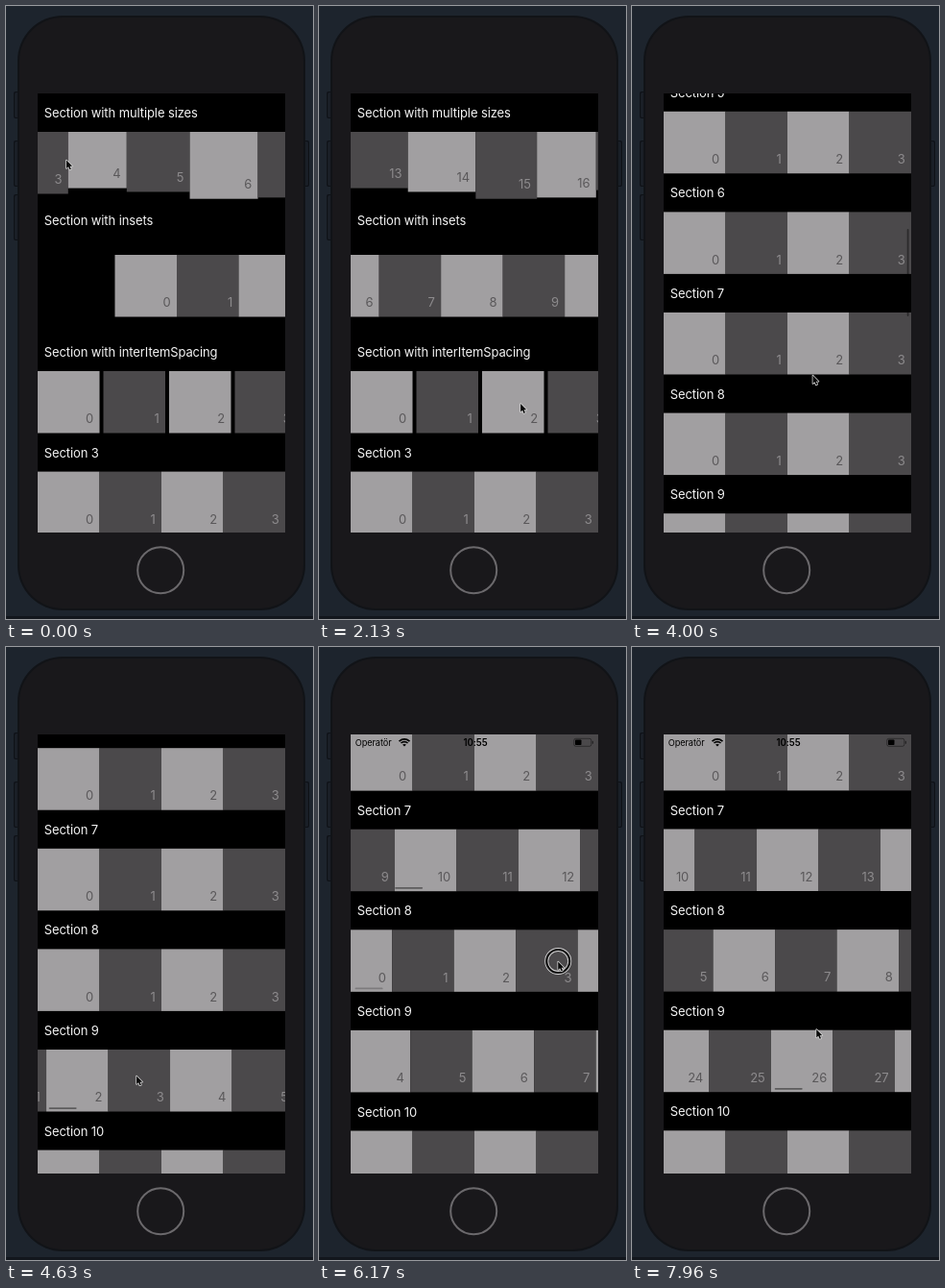
An HTML page with a canvas for the animation above (8000 ms loop, 320x638 px).

```html
<!DOCTYPE html>
<html lang="en">
<head>
<meta charset="utf-8">
<title>Sections</title>
<style>
  html, body { margin: 0; width: 100%; height: 100%; overflow: hidden; background: #1d242d; }
  canvas { display: block; width: 320px; height: 638px; }
</style>
</head>
<body>
<canvas id="stage"></canvas>
<script>
const LOOP = 8000;
const SCREEN = { x: 33, y: 91, w: 258, h: 457 };
const CELL = SCREEN.w / 4, HEAD = 40, PITCH = 104.6;
const HOLD = 300, TAU = 340;
const LIGHT = '#a19fa1', DARK = '#4b494b', INK = '#000';
const TITLES = ['Section with multiple sizes', 'Section with insets', 'Section with interItemSpacing'];
const PAGE = 'page';

// A flick drags for HOLD ms from (x, y), then coasts; total is the whole distance
const flick = (row, from, x, y, total, tau = TAU) =>
  ({ row, from, to: from + HOLD, x, y, total, tau, drag: Math.min(total * 0.3, 230) });

const FLICKS = [
  flick(0, -HOLD, 292.5, 160, 861),
  flick(1, 1266, 265, 291, 579.3),
  flick(2, 2150, 210, 414, 663),
  flick(PAGE, 3242, 125, 423, 713.5),
  flick(9, 4244, 212, 451, 261.9),
  flick(7, 5510, 228, 234, 677, 200),
  flick(8, 6065, 270, 327, 337.6),
  flick(9, 6970, 226, 460, 1465)
];
const REST = { from: LOOP, x: 193, y: 397 };

const canvas = document.getElementById('stage');
const ctx = canvas.getContext('2d');
const ratio = window.devicePixelRatio || 1;
canvas.width = 320 * ratio;
canvas.height = 638 * ratio;

const clamp = v => Math.max(0, Math.min(1, v));
const dragged = (f, t) => f.drag * clamp((t - f.from) / HOLD) ** 1.5;
const coasted = (f, t) => (f.total - f.drag) * (1 - Math.exp(Math.min(0, f.to - t) / f.tau));
const begun = (row, t) => FLICKS.filter(f => f.row === row && t >= f.from);
const scrollOf = (row, t) => begun(row, t).reduce((sum, f) => sum + dragged(f, t) + coasted(f, t), 0);

function barAlpha(row, t) {
  const f = begun(row, t).pop();
  return f ? Math.min(clamp((t - f.from) / 200), clamp((f.to + 1060 - t) / 100)) : 0;
}

const itemWidth = i => 66 + 5 * Math.cos((i - 6) * 1.62);
const itemHeight = i => 64.5 + 6 * Math.sin((i * 80 - 60) * Math.PI / 180);

function rect(x, y, w, h, color) {
  ctx.fillStyle = color;
  ctx.fillRect(x, y, w, h);
}

function round(x, y, w, h, r, color) {
  ctx.fillStyle = color;
  ctx.beginPath();
  ctx.roundRect(x, y, w, h, r);
  ctx.fill();
}

function ring(x, y, r, width, color) {
  ctx.strokeStyle = color;
  ctx.lineWidth = width;
  ctx.beginPath();
  ctx.arc(x, y, r, 0, Math.PI * 2);
  ctx.stroke();
}

function text(str, x, y, color, size = 13, align = 'left', weight = 400) {
  ctx.font = `${weight} ${size}px Inter, "Open Sans", sans-serif`;
  ctx.textAlign = align;
  ctx.fillStyle = color;
  ctx.fillText(str, x, y);
}

function button(x, y, h) {
  round(x, y, 7, h, 2, '#0e1116');
  round(x + 1, y + 1, 5, h - 2, 1.5, '#1a1f27');
}

function drawPhone() {
  rect(0, 0, 320, 638, '#1d242d');
  rect(0, 635, 320, 3, '#12161c');
  button(8, 89, 28);
  button(8, 140, 48);
  button(8, 196, 48);
  button(309, 140, 48);
  round(12, 10, 300, 619, 47, '#111317');
  round(14, 12, 296, 615, 45, '#19181b');
  ring(161.2, 587.3, 24, 2, '#6b696c');
}

function drawCell(i, x, y, w, h) {
  if (x > SCREEN.x + SCREEN.w || x + w < SCREEN.x) return;
  const odd = i % 2;
  rect(x, y, w, h, odd ? DARK : LIGHT);
  text(i, x + w - 6.3, y + h - 10.3, odd ? '#8d8b8d' : '#5a585a', 13, 'right');
}

function drawBar(x, y, w, h, alpha) {
  if (alpha) round(x, y, w, h, 0.9, `rgba(0,0,0,${0.42 * alpha})`);
}

function drawSection(n, top, height, t) {
  const shift = scrollOf(n, t);
  const inset = n === 1;
  const gap = n === 2 ? 4 : 0;
  let x = SCREEN.x - shift + (inset ? 80.5 : 0);
  text(TITLES[n] || 'Section ' + n, 39.7, top + 25, '#f4f4f4');
  for (let i = 0; x < SCREEN.x + SCREEN.w; i++) {
    const w = n ? CELL : itemWidth(i);
    drawCell(i, x, top + HEAD + (inset ? 16 : 0), w, n ? CELL : itemHeight(i));
    x += w + gap;
  }
  drawBar(36 + shift * 0.072, top + height - 4.4, 29, 1.8, barAlpha(n, t));
}

function drawStatus() {
  text('Operatör', 37.8, 102.6, INK, 9.2);
  text('10:55', 163, 102.7, INK, 9.7, 'center', 600);
  ctx.save();
  ctx.beginPath();
  ctx.moveTo(89, 103.5);
  ctx.arc(89, 103.5, 9, -Math.PI * 0.75, -Math.PI * 0.25);
  ctx.clip();
  for (const r of [7.6, 4.8, 1.3]) ring(89, 103.5, r, r < 2 ? 2.6 : 1.7, INK);
  ctx.restore();
  ctx.strokeStyle = 'rgba(0,0,0,.5)';
  ctx.lineWidth = 0.8;
  ctx.beginPath();
  ctx.roundRect(265.8, 95.3, 18, 8, 1.8);
  ctx.stroke();
  round(267, 96.5, 6.5, 5.6, 0.8, INK);
  round(284.7, 97.8, 1.3, 3, 0.6, 'rgba(0,0,0,.5)');
}

function drawScreen(t) {
  const page = scrollOf(PAGE, t);
  ctx.save();
  ctx.beginPath();
  ctx.rect(SCREEN.x, SCREEN.y, SCREEN.w, SCREEN.h);
  ctx.clip();
  rect(SCREEN.x, SCREEN.y, SCREEN.w, SCREEN.h, '#000');
  let top = SCREEN.y - page;
  for (let n = 0; top < SCREEN.y + SCREEN.h; n++) {
    const height = [112, 137][n] || PITCH;
    drawSection(n, top, height, t);
    top += height;
  }
  drawBar(286.7, 114 + page * 0.202, 1.8, 91, barAlpha(PAGE, t));
  drawStatus();
  ctx.restore();
}

// The pointer follows the current drag, or eases on to where the next one starts
function pointerAt(t) {
  const k = FLICKS.findLastIndex(f => t >= f.from);
  const f = FLICKS[k], next = FLICKS[k + 1] || REST;
  const d = dragged(f, t);
  const x = f.row === PAGE ? f.x : Math.max(40, f.x - d);
  const y = f.row === PAGE ? f.y - d : f.y;
  const u = clamp((t - f.to) / (next.from - f.to));
  const e = u * u * (3 - 2 * u);
  return { x: x + (next.x - x) * e, y: y + (next.y - y) * e, down: t < f.to };
}

function drawPointer(t) {
  const { x, y, down } = pointerAt(t);
  if (down) {
    ring(x + 0.5, y, 12, 4, 'rgba(255,255,255,.75)');
    ring(x + 0.5, y, 12, 2.2, '#0a0a0a');
  }
  ctx.save();
  ctx.translate(x, y);
  const arrow = new Path2D('M.5 .5V9L2.5 7.2 3.8 10.3 5.3 9.7 4 6.7H6.6Z');
  ctx.lineJoin = 'round';
  ctx.lineWidth = 1.5;
  ctx.strokeStyle = '#d8d8d8';
  ctx.stroke(arrow);
  ctx.fillStyle = '#0a0a0a';
  ctx.fill(arrow);
  ctx.restore();
}

const begin = performance.now();

function frame() {
  const t = (performance.now() - begin) % LOOP;
  ctx.setTransform(ratio, 0, 0, ratio, 0, 0);
  ctx.letterSpacing = '-0.1px';
  drawPhone();
  drawScreen(t);
  drawPointer(t);
  requestAnimationFrame(frame);
}
frame();
</script>
</body>
</html>
```
